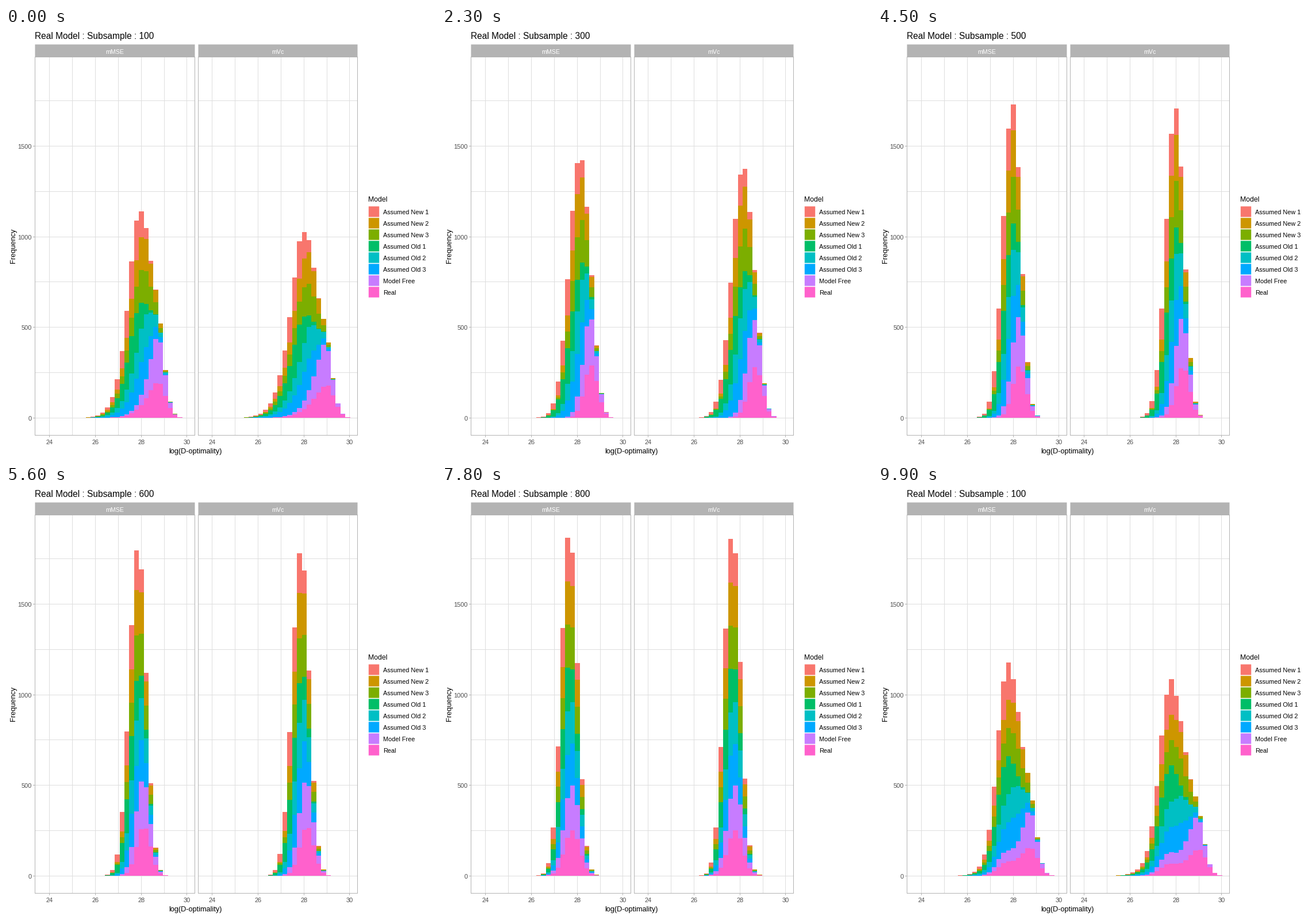
Write a matplotlib script that moves like this. It is 748 px wide and 748 px high and loops after 10000 ms.

```python
import matplotlib.pyplot as plt
import numpy as np
from matplotlib.animation import FuncAnimation
from matplotlib.patches import Polygon, Rectangle

SIZE, DPI = 748, 100
BINS, BIN_W, DRAWS = 30, 8.412, 1000
TOP, BOTTOM, ZERO = 50, 708, 678
Y_UNIT, X_UNIT = 0.315, 39.87
GRID, EDGE, TICK_TEXT = "#dedede", "#b3b3b3", "#4d4d4d"

# name, left, right, first tick, first bin edge
PANELS = [("mMSE", 50, 328, 75.7, 63.45), ("mVc", 334, 611, 358.7, 346.8)]

# Each kind of model: mode, left and right spread (in bins) at the key sizes,
# and how far its mode moves up in the second panel
KEY_SIZES = (100, 300, 500, 900)
LOW = ((18.6, 18.8, 18.5, 17.55), (1.8, 1.85, 1.75, 1.65), (1.45, 1.7, 1.45, 1.65), 0.2)
MID = ((20.4, 20.5, 19.75, 17.95), (2.1, 1.7, 1.6, 1.65), (1.8, 1.45, 1.45, 1.65), 0.4)
FREE = ((23.4, 22.4, 20.9, 18.1), (1.6, 1.45, 1.5, 1.65), (1.25, 1.35, 1.4, 1.65), 0.8)
REAL = ((23.4, 22.8, 21.3, 18.2), (2.1, 1.3, 1.4, 1.65), (1.6, 1.4, 1.35, 1.65), 1.2)
MODELS = [
    ("Assumed New 1", "#f8766d", LOW), ("Assumed New 2", "#cd9600", MID),
    ("Assumed New 3", "#7cae00", MID), ("Assumed Old 1", "#00be67", LOW),
    ("Assumed Old 2", "#00bfc4", MID), ("Assumed Old 3", "#00a9ff", MID),
    ("Model Free", "#c77cff", FREE), ("Real", "#ff61cc", REAL),
]

STATES = range(100, 1000, 100)
# First frame and number of steps of each transition
MOVES = [(6, 6), (18, 6)] + [(30 + 11 * i, 5) for i in range(7)]
FRAMES, INTERVAL = 100, 100


def counts(kind, size, panel):
    """Histogram of one model: a two-sided bell with a longer left tail at small sizes."""
    mode, left, right = (np.interp(size, KEY_SIZES, keys) for keys in kind[:3])
    lag = np.exp((100 - size) / 170)
    mode += panel * kind[3] * lag
    left += panel * 0.3 * lag
    k = np.arange(BINS)
    z = np.abs(k - mode) / np.where(k < mode, left, right)
    bell = np.exp(-0.5 * z ** np.where(k < mode, 2 - 0.5 * lag, 2))
    return DRAWS * bell / bell.sum()


def stacks(size):
    """Layer tops for both panels, from the bottom model upwards."""
    return np.array([
        np.cumsum([counts(kind, size, p) for _, _, kind in reversed(MODELS)], axis=0)
        for p in range(len(PANELS))
    ])


heights = [stacks(size) for size in STATES]

fig = plt.figure(figsize=(SIZE / DPI, SIZE / DPI), dpi=DPI, facecolor="white")
ax = fig.add_axes([0, 0, 1, 1])
ax.set_xlim(0, SIZE)
ax.set_ylim(SIZE, 0)
ax.axis("off")


def box(x, y, w, h, color, z=1, smooth=False):
    ax.add_patch(Rectangle((x, y), w, h, facecolor=color, linewidth=0,
                           antialiased=smooth, snap=not smooth, zorder=z))


def label(x, y, s, px, color="black", **kw):
    kw.setdefault("va", "baseline")
    return ax.text(x, y, s, fontsize=px * 72 / DPI, color=color,
                   family="Liberation Sans", zorder=6, **kw)


def draw_panel(name, x0, x1, first_tick):
    w = x1 - x0 + 1
    for i in range(8):
        box(x0, int(ZERO - 250 * i * Y_UNIT), w, 1, GRID)
    for i in range(7):
        x = int(first_tick + X_UNIT * i)
        box(x, TOP, 1, BOTTOM - TOP, GRID)
        if i % 2 == 0:
            box(x, BOTTOM + 1, 1, 3, EDGE)
            label(x + 0.5, 724, str(24 + i), 11, TICK_TEXT, ha="center")
    for y in (TOP, BOTTOM):
        box(x0, y, w, 1, EDGE, 5)
    for x in (x0, x1):
        box(x, TOP, 1, BOTTOM - TOP, EDGE, 5)
    box(x0 + 0.5, 28.6, w - 1, 21.4, EDGE, smooth=True)
    label((x0 + x1) / 2, 44.5, name, 10.6, "white", ha="center")


def make_layers(first_edge):
    """One step polygon per model, the tallest painted first."""
    xs = np.repeat(np.floor(first_edge + BIN_W * np.arange(BINS + 1)), 2)
    shapes = []
    for i, (_, color, _) in enumerate(MODELS):
        flat = np.column_stack([xs, np.full(xs.size, ZERO)])
        shapes.append(ax.add_patch(Polygon(
            flat, closed=True, facecolor=color, linewidth=0,
            antialiased=False, zorder=2 + i / 10)))
    return xs, shapes[::-1]


bars = []
for name, x0, x1, tick, edge in PANELS:
    draw_panel(name, x0, x1, tick)
    bars.append(make_layers(edge))

for value in range(0, 2000, 500):
    y = int(ZERO - value * Y_UNIT)
    box(47, y, 3, 1, EDGE)
    label(45, y + 5, str(value), 11, TICK_TEXT, ha="right")

title = label(50, 19, "", 15.5)
label(329, 740, "log(D-optimality)", 12.6, ha="center")
label(13, 378.5, "Frequency", 12.7, rotation=90, ha="center", va="center")
label(630, 302, "Model", 12.3)
for i, (name, color, _) in enumerate(MODELS):
    box(630.8, 310.3 + 20 * i, 18.4, 18.4, color, smooth=True)
    label(656, 324 + 20 * i, name, 10.85)


def pose(frame):
    """Index of the current and next state, and the share of the way between."""
    now, t = 0, 0
    for i, (start, steps) in enumerate(MOVES):
        if frame >= start:
            now, t = i, min((frame - start + 1) / steps, 1)
    return now, (now + 1) % len(STATES), t


def update(frame):
    now, nxt, t = pose(frame)
    title.set_text(f"Real Model : Subsample : {STATES[nxt if t >= 0.5 else now]}")
    mixed = heights[now] * (1 - t) + heights[nxt] * t
    for (xs, shapes), layers in zip(bars, mixed):
        for shape, tops in zip(shapes, layers):
            ys = np.repeat(np.round(ZERO - Y_UNIT * tops), 2)
            shape.set_xy(np.column_stack([xs, np.r_[ZERO, ys, ZERO]]))
    return []


anim = FuncAnimation(fig, update, frames=FRAMES, interval=INTERVAL, repeat=True,
                     repeat_delay=0, init_func=lambda: update(0),
                     cache_frame_data=False)
plt.show()
```
